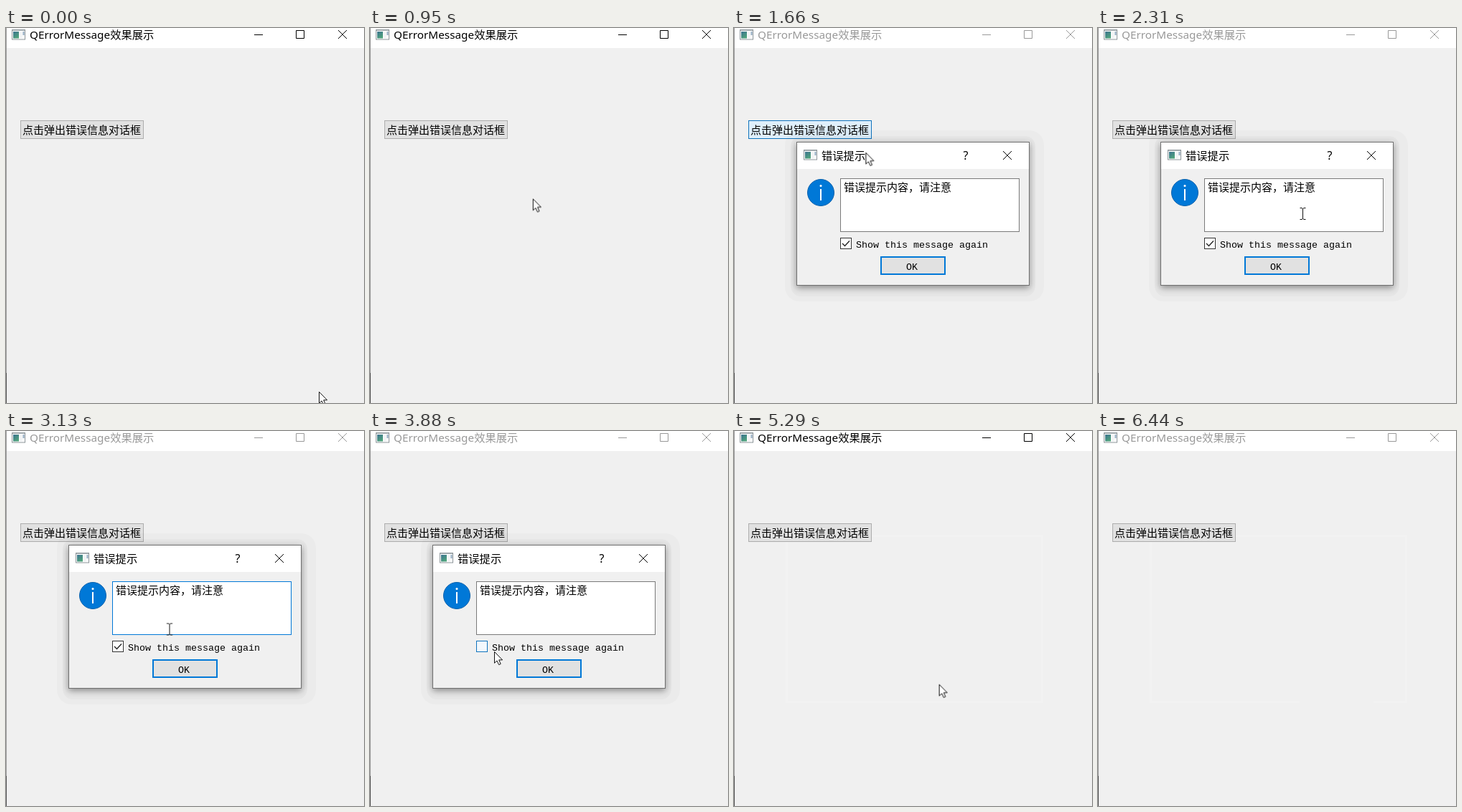
Write an HTML page that moves like this. It is 499 px wide and 524 px high and loops after 6.47 s.

```html
<!DOCTYPE html>
<html lang="zh-CN">
<head>
<meta charset="utf-8">
<title>QErrorMessage</title>
<style>
html, body { margin: 0; width: 100%; height: 100%; overflow: hidden; background: #f0f0f0; }
svg { display: block; }
text { font: 15px "Noto Sans CJK SC", "Noto Sans CJK", sans-serif; white-space: pre; }
.title { font: 15.3px "Noto Sans", "Noto Sans CJK SC", "Noto Sans CJK", sans-serif; fill: currentColor; }
.mono { font: 13.33px "Liberation Mono", monospace; }
.line { fill: none; stroke: currentColor; }

/* Every part shares one 6470 ms loop; percentages are ms / 64.7. */
.loop { animation: 6470ms linear infinite; }
.flip { animation: 6470ms step-end infinite; }

#caption { animation-name: caption; }
@keyframes caption {
  0%, 73.26% { color: #000; }
  21.33%, 99.54%, 100% { color: #999; }
}

#launchHot { animation-name: launch; }
@keyframes launch {
  0%, 18.8% { opacity: 0; }
  20.5%, 27.8% { opacity: 1; }
  30.9%, 100% { opacity: 0; }
}

#dialog { animation-name: dialog; transform-origin: 249px 259.5px; }
@keyframes dialog {
  0%, 21.32% { opacity: 0; transform: scale(.955); }
  21.33% { opacity: .2; transform: scale(.955); }
  23.03% { opacity: .55; transform: scale(.978); }
  25.5%, 73.4% { opacity: 1; transform: none; }
  75.73%, 100% { opacity: 0; transform: scale(.95); }
}

#edge { animation-name: edge; }
@keyframes edge {
  0% { stroke: #18b4c8; }
  25.5%, 100% { stroke: #707070; }
}

#controls { animation-name: controls; }
@keyframes controls {
  0% { opacity: 1; }
  73.26%, 100% { opacity: 0; }
}

#edit { animation-name: edit; }
@keyframes edit {
  0%, 52.86%, 100% { stroke: #7a7a7a; }
  39.1% { stroke: #0078d7; }
}

#box { animation-name: box; }
@keyframes box {
  0%, 33.9%, 64.2%, 100% { stroke: #333; fill: #fff; }
  32.9%, 52.86% { stroke: #0f73bd; fill: #f2f8fd; }
}

#tick { animation-name: tick; }
@keyframes tick {
  0%, 61.82%, 100% { opacity: 1; }
  55.49% { opacity: 0; }
}

#okHot { animation-name: ok; }
@keyframes ok {
  0%, 32.15% { opacity: 0; }
  30.9%, 66.3%, 100% { opacity: 1; }
}

#ghost { animation-name: ghost; }
@keyframes ghost {
  0% { opacity: 0; }
  75.73%, 100% { opacity: 1; }
}

#gap { animation-name: gap; }
@keyframes gap {
  0% { opacity: 0; }
  84.5%, 100% { opacity: 1; }
}

#cursor { animation-name: move; }
@keyframes move {
  0%, .93% { transform: translate(436px, 508px); }
  3.09% { transform: translate(478px, 490px); }
  4.64% { transform: translate(472px, 440px); }
  10.2%, 11.13% { transform: translate(260px, 300px); }
  19.94%, 24.73% { transform: translate(178px, 148px); }
  31.22% { transform: translate(215px, 325px); }
  33.08% { transform: translate(160px, 300px); }
  35.2%, 36.1% { transform: translate(285px, 259px); }
  36.94%, 42.97% { transform: translate(290px, 254px); }
  52.86%, 53.79% { transform: translate(176px, 295px); }
  55.49%, 62.6% { transform: translate(173px, 308px); }
  66.77%, 79.13% { transform: translate(256px, 338px); }
  81.76% { transform: translate(285px, 353px); }
  85.32% { transform: translate(410px, 505px); }
  88.72% { transform: translate(330px, 411px); }
  89.64%, 100% { transform: translate(325px, 394px); }
}

#arrow { animation-name: arrow; }
@keyframes arrow {
  0%, 29.7%, 50.4% { opacity: 1; }
  27%, 34.1%, 90.57%, 100% { opacity: 0; }
}

#beam { animation-name: beam; }
@keyframes beam {
  0%, 29.7%, 50.4%, 100% { opacity: 0; }
  27%, 34.1% { opacity: 1; }
}
</style>
</head>
<body>
<svg width="499" height="524" viewBox="0 0 499 524">
  <defs>
    <linearGradient id="teal" x2=".6" y2="1">
      <stop stop-color="#3d7390"/>
      <stop offset="1" stop-color="#4fa37c"/>
    </linearGradient>
    <g id="appIcon">
      <rect x=".5" y=".5" width="18" height="13.5" fill="#fff" stroke="#8b9498"/>
      <path d="M1 1.5H18" stroke="#b4bcc0"/>
      <rect x="2" y="3" width="8" height="9.5" fill="url(#teal)"/>
      <rect x="11" y="3" width="4" height="9.5" fill="#f2f4f5"/>
      <rect x="15.5" y="3" width="2" height="5" fill="#8fa9c0"/>
    </g>
    <path id="cross" d="M0 0L12 12M12 0L0 12"/>
  </defs>

  <!-- main window -->
  <rect width="499" height="524" fill="#f0f0f0"/>
  <rect width="499" height="28" fill="#fff"/>
  <path d="M.5 0V482" stroke="#a0a0a0"/>
  <path d="M.5 482V524" stroke="#555"/>
  <use href="#appIcon" x="8" y="2"/>
  <g id="caption" class="flip">
    <text class="title" x="33" y="15">QErrorMessage效果展示</text>
    <path class="line" d="M346 9.5H358M404.5 3.5H415.5V14.5H404.5Z"/>
    <use class="line" href="#cross" x="463" y="3"/>
  </g>

  <g id="ghost" class="flip">
    <rect x="73.5" y="146.5" width="356" height="232" fill="none" stroke="#f2f2f2" stroke-width="3"/>
    <rect id="gap" class="flip" x="281" y="376" width="103" height="5" fill="#f0f0f0"/>
  </g>

  <rect x="20.5" y="129.5" width="171" height="25" fill="#e1e1e1" stroke="#adadad"/>
  <rect id="launchHot" class="loop" x="20.5" y="129.5" width="171" height="25" fill="#dfeffb" stroke="#0f73bd"/>
  <text x="23" y="147.6">点击弹出错误信息对话框</text>

  <!-- message dialog -->
  <g id="dialog" class="loop">
    <rect x="71" y="143" width="361" height="239" rx="20" opacity=".018"/>
    <rect x="79" y="151" width="341" height="224" rx="14" opacity=".025"/>
    <rect x="87" y="159" width="325" height="201" fill="#f0f0f0" style="filter: drop-shadow(0 3px 5px rgba(0,0,0,.4))"/>
    <rect x="88" y="160" width="323" height="37" fill="#fff"/>
    <rect id="edge" class="flip" x="87.5" y="159.5" width="324" height="200" fill="none"/>
    <use href="#appIcon" x="97" y="170"/>
    <text class="title" x="122" y="184.3">错误提示</text>
    <g id="controls" class="flip">
      <text class="title" x="319.5" y="184" style="font-size: 16px">?</text>
      <use class="line" href="#cross" x="375" y="172"/>
    </g>

    <circle cx="121" cy="230" r="18.5" fill="#0078d7" stroke="#0a62ac"/>
    <path d="M121 225V241" stroke="#fff" stroke-width="2"/>
    <circle cx="121" cy="220.5" r="1.5" fill="#fff"/>

    <rect id="edit" class="flip" x="148.5" y="210.5" width="249" height="74" fill="#fff"/>
    <text x="153" y="228.3">错误提示内容，请注意</text>

    <rect id="box" class="flip" x="148.5" y="293.5" width="15" height="15"/>
    <path id="tick" class="flip" d="M151 301L154.5 304.5L161 297.5" fill="none" stroke="#222" stroke-width="1.4"/>
    <text class="mono" x="170" y="307">Show this message again</text>

    <rect x="205" y="320" width="89" height="24" fill="#e1e1e1" stroke="#0078d7" stroke-width="2"/>
    <g id="okHot" class="flip">
      <rect x="204" y="319" width="91" height="26" fill="#f0f0f0"/>
      <rect x="204.5" y="319.5" width="90" height="25" fill="#d9ebf9" stroke="#0f73bd"/>
    </g>
    <text class="mono" x="240" y="338">OK</text>
  </g>

  <g id="cursor" class="loop">
    <path id="arrow" class="flip" d="M.5 .5V16.3L4 13L6.6 18.6L9.2 17.5L6.7 11.9H11.6Z" fill="#fff" stroke="#111"/>
    <path id="beam" class="flip" d="M-3.5 -7.5H-1L.5 -6.5L2 -7.5H4.5M.5 -6.5V7.5M-3.5 8.5H-1L.5 7.5L2 8.5H4.5" fill="none" stroke="#111"/>
  </g>
</svg>
</body>
</html>
```
